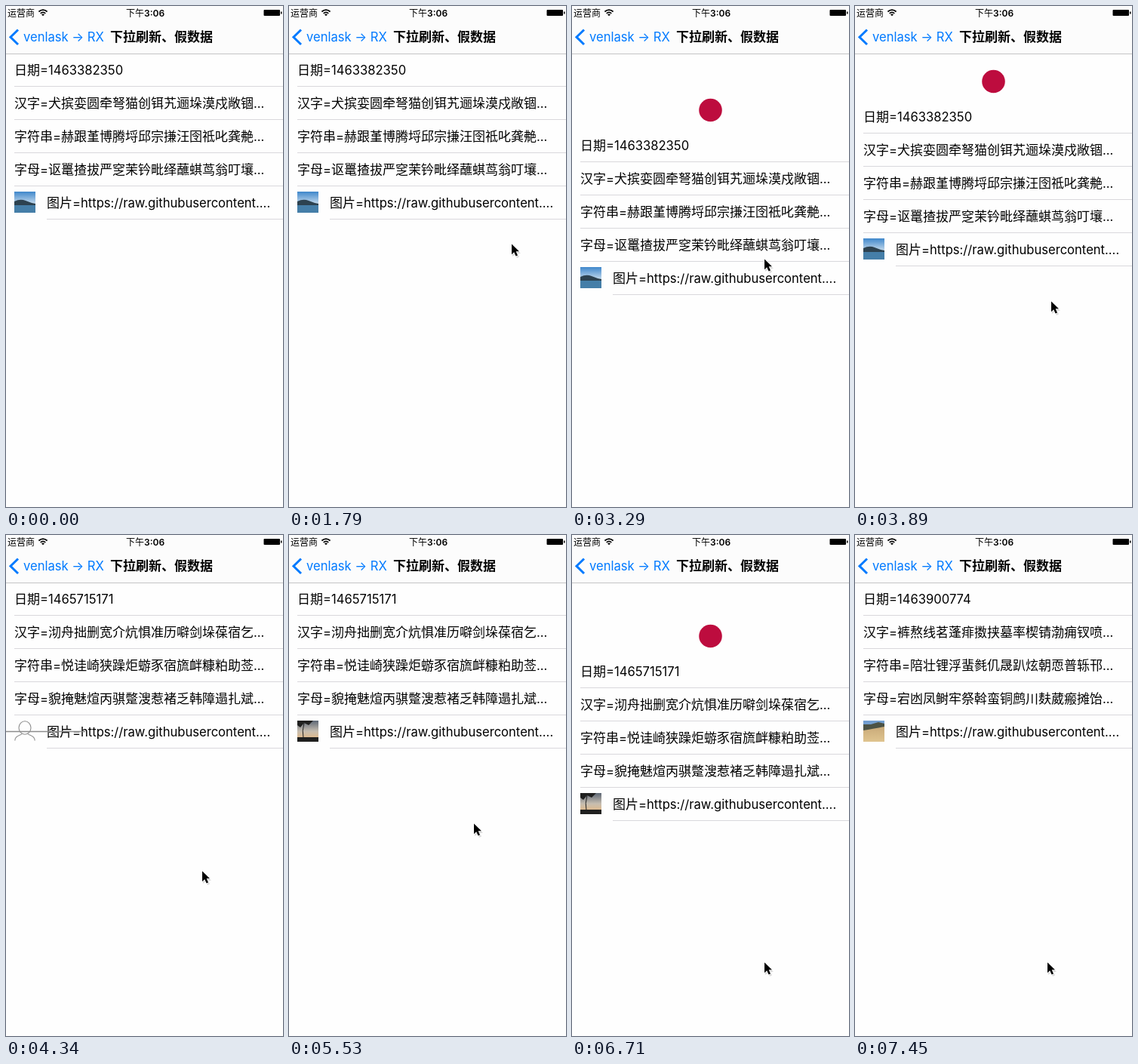
An HTML page that plays this animation: 367x664 px, repeating every 8000 ms.

```html
<!DOCTYPE html>
<html lang="zh-CN">
<head>
<meta charset="utf-8">
<style>
  html, body { margin: 0; width: 100%; height: 100%; overflow: hidden; background: #fefefe; }
  svg { display: block; }
  text { font: 17px "Noto Sans CJK SC", "Noto Sans CJK", sans-serif; white-space: pre; }
  .latin { font-family: Inter, Roboto, sans-serif; font-size: 16.6px; }
  .title { font-weight: 700; }
  .status, .status .latin { font-size: 12px; }
  .clock { font-weight: 500; }
  .clock .latin { font-weight: 600; }
</style>
</head>
<body>
<svg width="367" height="664" viewBox="0 0 367 664">
  <defs>
    <linearGradient id="sky" x2="0" y2="1">
      <stop stop-color="#3f87cb"/><stop offset="1" stop-color="#d3e3f0"/>
    </linearGradient>
    <linearGradient id="dusk" x2="0" y2="1">
      <stop stop-color="#5c6674"/><stop offset=".5" stop-color="#c6bdb0"/><stop offset="1" stop-color="#eeb878"/>
    </linearGradient>
    <linearGradient id="sand" x2="0" y2="1">
      <stop stop-color="#c9aa79"/><stop offset="1" stop-color="#dfc48f"/>
    </linearGradient>
  </defs>

  <g id="list">
    <circle cx="183.5" cy="38" r="15.3" fill="#bd0c3e"/>
    <g id="rows"></g>
    <g transform="translate(11 246)">
      <g id="avatar" fill="none" stroke="#8f8f8f" stroke-width="1.1">
        <ellipse cx="14" cy="9.5" rx="8" ry="8.7"/>
        <path d="M10 17.5C9 20 1 19 .8 26.5M18 17.5C19 20 27 19 27.2 26.5"/>
      </g>
      <g class="photo">
        <path fill="url(#sky)" d="M0 0H28V18H0z"/>
        <path fill="#2d4250" d="M0 13Q8 9 15 12T28 16V19H0z"/>
        <path fill="#457ea8" d="M0 18H28V28H0z"/>
      </g>
      <g class="photo">
        <path fill="url(#dusk)" d="M0 0H28V28H0z"/>
        <path fill="#20201f" d="M0 0H21L15 6L9 3L4 9L0 6zM0 22H28V28H0z"/>
        <path d="M9 3Q6 14 8 23" stroke="#20201f" fill="none"/>
      </g>
      <g class="photo">
        <path fill="#739fd0" d="M0 0H28V12H0z"/>
        <path fill="#4c5345" d="M0 5L10 5L20 2L28 4V14H0z"/>
        <path fill="url(#sand)" d="M0 13Q12 11 28 8V28H0z"/>
      </g>
    </g>
    <path id="progress" d="M0 260.5H105" stroke="#8c8c8c" stroke-width="1.5"/>
  </g>

  <g id="bar">
    <path fill="#fcfcfc" d="M0 0H367V63H0z"/>
    <path d="M0 63.5H367" stroke="#c4c4c6"/>
    <path d="M16 31.5L6 41.2L16 51" fill="none" stroke="#007aff" stroke-width="3"/>
    <path d="M43.4 7.5Q49 2.6 54.6 7.5M45.7 9.8Q49 6.8 52.3 9.8" fill="none" stroke="#000" stroke-width="1.7"/>
    <path d="M47 11.2Q49 9.6 51 11.2L49 13.2z"/>
    <rect x="341.5" y="5" width="21.5" height="8" rx="1"/>
    <rect x="364" y="7.5" width="1.5" height="3"/>
  </g>

  <g id="cursor">
    <path d="M1 2V17L4.5 14L7 19L10 17.5L8 13H12z" fill="#000" opacity=".14"/>
    <path d="M0 .5V14.2L3.2 11.2L5.6 16.5L8 15.4L5.7 10.3H10z" stroke="#fff" stroke-width="1.4" paint-order="stroke"/>
  </g>
</svg>

<script>
const DURATION = 8000;
const ROW_HEIGHT = 44;
const HEADER_HEIGHT = 54;
const SETTLE_TIME = 660;
const CLOSE_TIME = 190;
const $ = id => document.getElementById(id);

const url = "图片=https://raw.githubusercontent....";
const pages = [
  ["日期=1463382350", "汉字=犬摈娈圆牵弩猫创铒艽逦垛漠戍敞锢...",
   "字符串=赫跟堇博腾埒邱宗搛汪囹祗叱龚艴...", "字母=讴鼍揸拔严窆茉钤毗绎蘸蜞茑翁叮壤...", url],
  ["日期=1465715171", "汉字=沏舟拙删宽介炕惧准历噼剑垛葆宿乞...",
   "字符串=悦诖崎狭躁炬蝣豕宿旒衅糠粕助莶...", "字母=貌掩魅煊丙骐蹩溲惹褚乏韩障遢扎斌...", url],
  ["日期=1463900774", "汉字=裤熬线茗蓬痱擞挟墓率楔锖渤痈钗喷...",
   "字符串=陪壮锂浮蜚毵仉晟趴炫朝恧普轹邗...", "字母=宕凼凤鲥牢祭斡蛮铜鹧川麸葳瘢摊饴...", url]
];

// Latin runs get their own font and size
function label(string, x, y, attributes = "") {
  const runs = string.replace(/[ -~]+/g, run =>
    `<tspan class="latin">${run.replace(/>/g, "&gt;")}</tspan>`);
  return `<text x="${x}" y="${y}" ${attributes}>${runs}</text>`;
}

function row(string, index) {
  const x = string === url ? 54 : 11;
  const top = 63 + ROW_HEIGHT * index;
  return label(string, x, top + 28) + `<path d="M${x} ${top + 43.5}H367" stroke="#d9d8dc"/>`;
}

$("bar").insertAdjacentHTML("beforeend",
  label("运营商", 2, 13.5, 'class="status"') +
  label("下午3:06", 159, 13.5, 'class="status clock"') +
  label("venlask -> RX", 23, 47, 'fill="#007aff"') +
  label("下拉刷新、假数据", 138, 47.2, 'class="title"'));
$("rows").innerHTML = pages.map(page => `<g>${page.map(row).join("")}</g>`).join("");

const rowGroups = [...$("rows").children];
const photos = [...document.querySelectorAll(".photo")];

const clamp = value => Math.min(1, Math.max(0, value));
const easeOut = p => 1 - (1 - p) ** 3;
const mix = (a, b, p) => a + (b - a) * p;

// The screen is redrawn about every 150 ms, only within these spans
const activeSpans = [[1350, 2240], [2540, 3440], [3590, 4340],
                     [4790, 4930], [5380, 6410], [6560, 7450]];

function lastRedraw(time) {
  const span = activeSpans.filter(([start]) => start <= time).pop();
  if (!span) return 0;
  const [start, end] = span;
  const step = (end - start) / Math.round((end - start) / 150);
  const count = Math.floor((Math.min(time, end) - start + 5) / step);
  return start + count * step;
}

const refreshes = [
  { drag: 2630, release: 3590, close: 4150, peak: 103 },
  { drag: 5760, release: 6710, close: 7260, peak: 96 }
];

function pullOf({ drag, release, close, peak }, time) {
  if (time < release) return peak * easeOut(clamp((time - drag) / (release - drag)));
  const settled = mix(peak, HEADER_HEIGHT, easeOut(clamp((time - release) / SETTLE_TIME)));
  return settled * (1 - clamp((time - close) / CLOSE_TIME));
}

// Cursor key points: time, x, y
const cursorPath = [
  [1350, 349, 524], [2240, 240, 106], [2540, 241, 120], [2840, 247, 243],
  [3440, 257, 366], [3890, 260, 391], [4340, 260, 445], [5230, 260, 445],
  [5700, 236, 345], [6120, 230, 495], [6710, 255, 566], [DURATION, 255, 566]
];

function cursorAt(time) {
  const next = Math.max(1, cursorPath.findIndex(point => point[0] > time));
  const [from, to] = [cursorPath[next - 1], cursorPath[next]];
  const p = clamp((time - from[0]) / (to[0] - from[0]));
  return [mix(from[1], to[1], p), mix(from[2], to[2], p)];
}

const show = (element, opacity) => element.setAttribute("opacity", Number(opacity));
const move = (element, x, y) =>
  element.setAttribute("transform", `translate(${Math.round(x)} ${Math.round(y)})`);

function draw(now) {
  const time = lastRedraw(now % DURATION);
  const page = refreshes.filter(refresh => time >= refresh.close).length;
  const pull = refreshes.reduce((sum, refresh) => sum + pullOf(refresh, time), 0);
  // The second photo fades in after its placeholder
  const loaded = page === 1 ? clamp((time - 4650) / 280) : 1;

  move($("list"), 0, pull);
  move($("cursor"), ...cursorAt(time));
  show($("cursor"), time > 0);
  rowGroups.forEach((group, i) => show(group, i === page));
  photos.forEach((photo, i) => show(photo, i === page ? loaded : 0));
  show($("avatar"), 1 - loaded);
  show($("progress"), loaded === 0);
  requestAnimationFrame(draw);
}
requestAnimationFrame(draw);
</script>
</body>
</html>
```
